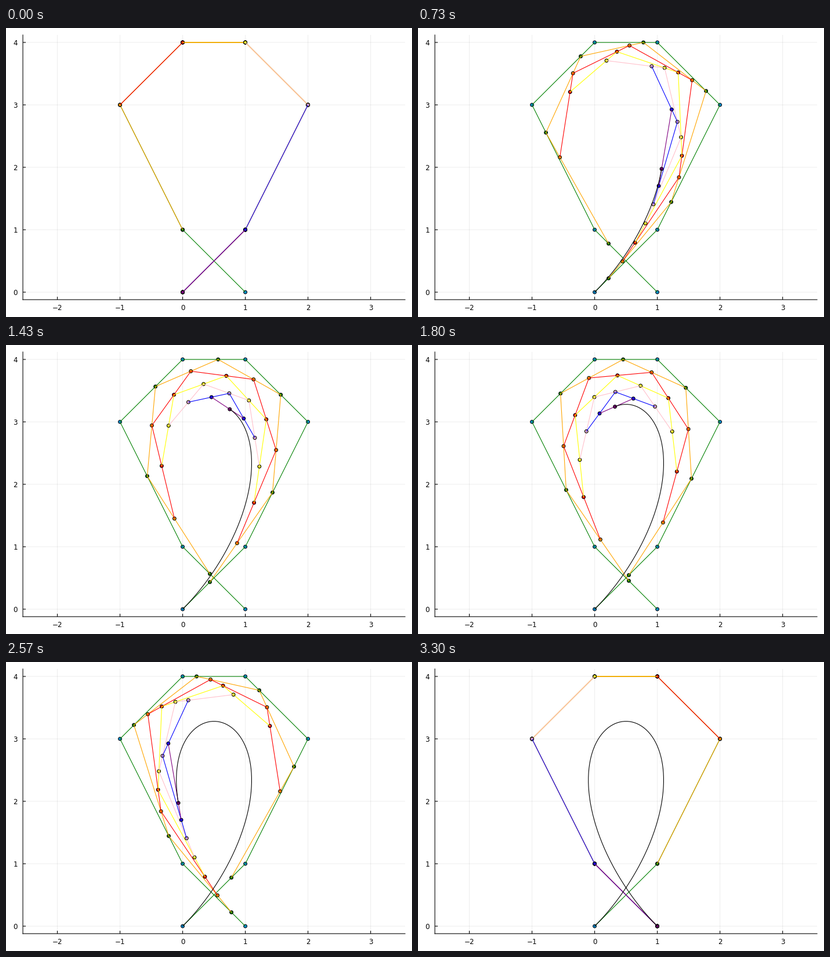
Recreate the animation shown at these times as a matplotlib script. Size 700x500 px, loop 3330 ms.

```python
import numpy as np
import matplotlib.pyplot as plt
from matplotlib.animation import FuncAnimation

W, H, DPI = 700, 500, 100
STEPS = 100
TICK_MS = 10
TICKS = 333  # one loop on a 10 ms clock
PX = 72 / DPI  # one pixel in points

LEFT, BOTTOM, AX_W, AX_H = 29.1, 30, 659, 458
TICK_LEN = 5
DOT = 5.7
LINE = 1.1

CONTROL = np.array([(0, 0), (1, 1), (2, 3), (1, 4),
                    (0, 4), (-1, 3), (0, 1), (1, 0)], float)
LINE_COLORS = ["green", "orange", "red", "yellow", "pink", "blue", "purple"]
DOT_COLORS = ["#009afa"] + LINE_COLORS

plt.rcParams["font.family"] = "DejaVu Sans"
plt.rcParams["path.snap"] = False


def casteljau(t):
    """All levels of the construction, from the control polygon to one point."""
    levels = [CONTROL]
    while len(levels[-1]) > 1:
        p = levels[-1]
        levels.append((1 - t) * p[:-1] + t * p[1:])
    return levels


def make_axes(fig):
    ax = fig.add_axes([LEFT / W, BOTTOM / H, AX_W / W, AX_H / H])
    ax.set_xlim(-2.55, 3.55)
    ax.set_ylim(-0.12, 4.12)
    xs, ys = range(-2, 4), range(5)
    ax.set_xticks(xs)
    ax.set_yticks(ys)
    ax.set_axisbelow(True)
    ax.grid(color="black", alpha=0.07, lw=PX)
    ax.spines[["top", "right"]].set_visible(False)
    ax.spines[["left", "bottom"]].set_linewidth(LINE * PX)
    ax.tick_params(length=0, labelsize=8.6)
    ax.tick_params(axis="x", pad=7.5 * PX)
    ax.tick_params(axis="y", pad=9 * PX)
    # Inward tick marks at sub-pixel positions.
    style = dict(color="black", lw=LINE * PX, zorder=2)
    ax.vlines(xs, 0, TICK_LEN / AX_H, transform=ax.get_xaxis_transform(), **style)
    ax.hlines(ys, 0, TICK_LEN / AX_W, transform=ax.get_yaxis_transform(), **style)
    ax.set_xlim(-2.55, 3.55)
    ax.set_ylim(-0.12, 4.12)
    return ax


fig = plt.figure(figsize=(W / DPI, H / DPI), dpi=DPI, facecolor="white")
ax = make_axes(fig)

# Each level's line lies over its own dots and under the next level's dots.
dots, lines = [], []
sizes = np.full(len(CONTROL), (DOT * PX) ** 2)
for level, color in enumerate(DOT_COLORS):
    z = 3 + level
    dots.append(ax.scatter(*CONTROL.T, s=sizes, facecolor=color,
                           edgecolor="black", lw=LINE * PX, zorder=z))
    if level < len(LINE_COLORS):
        lines += ax.plot([], [], color=LINE_COLORS[level], lw=LINE * PX,
                         zorder=z + 0.5)
curve, = ax.plot([], [], color="black", lw=LINE * PX, zorder=20)

ts = np.linspace(0, 1, STEPS)
path = np.array([casteljau(t)[-1][0] for t in ts])


def update(tick):
    i = int((tick + 0.5) * STEPS / TICKS)
    levels = casteljau(ts[i])
    for dot, points in zip(dots, levels):
        dot.set_offsets(points)
    for line, points in zip(lines, levels):
        line.set_data(*points.T)
    curve.set_data(*path[:i + 1].T)
    return [*dots, *lines, curve]


anim = FuncAnimation(fig, update, frames=TICKS, interval=TICK_MS,
                     repeat=True, repeat_delay=0, blit=False)
plt.show()
```
